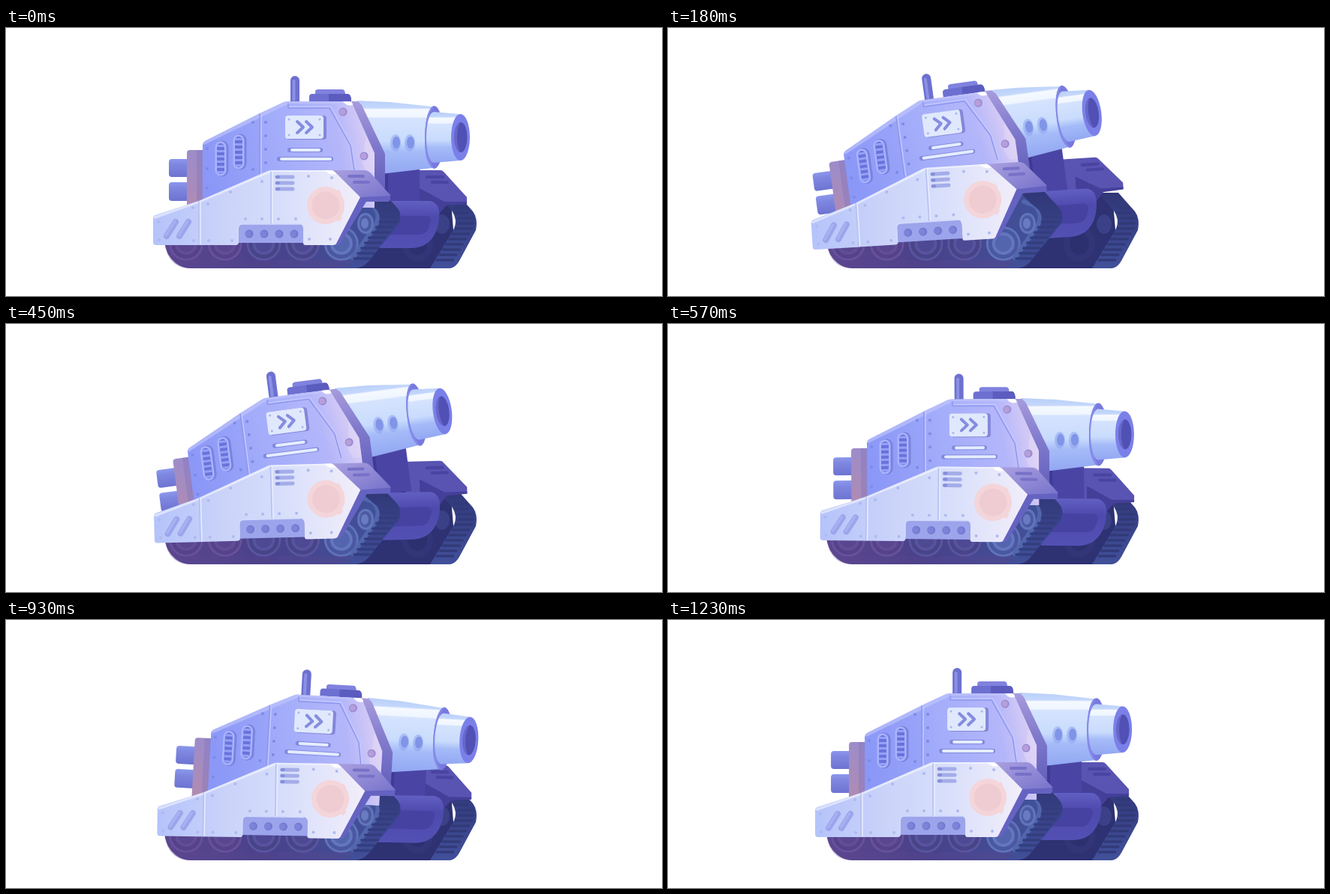
Animation of 874 by 358 pixels, one loop 1260 ms. Source, as an HTML page:

```html
<!DOCTYPE html>
<html lang="en">
<head>
<meta charset="utf-8">
<title>Tank recoil</title>
<style>
  html, body { margin: 0; width: 100%; height: 100%; overflow: hidden; background: #fff; }
  svg { display: block; width: 100%; height: 100%; }
  .line { fill: none; stroke-linecap: round; stroke-linejoin: round; }
</style>
</head>
<body>
<svg viewBox="0 0 874 358">
  <defs>
    <linearGradient id="track" gradientUnits="userSpaceOnUse" x1="211" x2="500">
      <stop stop-color="#5d4690"/><stop offset=".45" stop-color="#49418a"/><stop offset="1" stop-color="#40529a"/>
    </linearGradient>
    <linearGradient id="tread" gradientUnits="userSpaceOnUse" x1="0" x2="0" y1="220" y2="321">
      <stop stop-color="#303778"/><stop offset="1" stop-color="#41509a"/>
    </linearGradient>
    <linearGradient id="body" gradientUnits="userSpaceOnUse" x1="262" y1="190" x2="495" y2="145">
      <stop stop-color="#8c98f7"/><stop offset=".45" stop-color="#a3adfa"/>
      <stop offset=".78" stop-color="#b4b6fa"/><stop offset="1" stop-color="#e2d3f3"/>
    </linearGradient>
    <linearGradient id="face" x2="0" y2="1">
      <stop stop-color="#a79bdc"/><stop offset=".5" stop-color="#7f79cc"/><stop offset="1" stop-color="#6461bd"/>
    </linearGradient>
    <linearGradient id="skirt" gradientUnits="userSpaceOnUse" x1="196" x2="472">
      <stop stop-color="#b4c3fa"/><stop offset=".35" stop-color="#cbd3f9"/>
      <stop offset=".56" stop-color="#d3dcfb"/><stop offset="1" stop-color="#f2eefa"/>
    </linearGradient>
    <linearGradient id="steel" x2="0" y2="1">
      <stop stop-color="#b9cff9"/><stop offset=".1" stop-color="#c5d8fc"/><stop offset=".12" stop-color="#f5f9ff"/>
      <stop offset=".22" stop-color="#f0f6ff"/><stop offset=".24" stop-color="#d5e3fe"/>
      <stop offset=".55" stop-color="#c9dcfd"/><stop offset=".7" stop-color="#a5bbf8"/><stop offset="1" stop-color="#92a7f2"/>
    </linearGradient>
    <linearGradient id="engine" x2="0" y2="1">
      <stop stop-color="#9d8cc9"/><stop offset="1" stop-color="#b18bb0"/>
    </linearGradient>
    <linearGradient id="pipe" x2="0" y2="1">
      <stop stop-color="#8c97ec"/><stop offset=".3" stop-color="#7f88e0"/><stop offset="1" stop-color="#6d73d2"/>
    </linearGradient>
    <linearGradient id="belly" x2="0" y2="1">
      <stop stop-color="#625fc2"/><stop offset=".35" stop-color="#4e4aad"/><stop offset="1" stop-color="#5350b4"/>
    </linearGradient>
    <linearGradient id="fender" x2="1" y2="1">
      <stop stop-color="#aaa0e0"/><stop offset="1" stop-color="#7773cb"/>
    </linearGradient>
  </defs>

  <!-- far track -->
  <path fill="#2e3172" d="M450 321L520 222H592L600 316Q596 321 588 321Z"/>
  <ellipse cx="548" cy="288" rx="21" ry="24" fill="#323679"/>
  <ellipse cx="548" cy="288" rx="13" ry="15" fill="#2d306f"/>
  <ellipse cx="581" cy="262" rx="10" ry="13" fill="#3a4187"/>
  <path fill="url(#tread)" d="M572 220H600L622 245Q629 254 626 270L604 311Q599 321 588 321H565L597 268Q602 256 594 244Z"/>
  <path class="line" id="farTread" stroke="#313977" stroke-width="3"/>

  <g class="hull">
    <path fill="#5953b2" d="M532 190H579Q582 190 584 193L614 226V234H586L574 248H532Z"/>
    <path fill="#443f99" d="M551 214L584 232H614V235L587 237L574 252H551Z"/>
    <path class="line" stroke="#4944a0" stroke-width="4" d="M561 199H582M568 206H588"/>
  </g>
  <g class="turret">
    <path fill="#4a45a5" d="M488 165H551V246H488Z"/>
    <path fill="#3f3a94" d="M488 165H509V246H488Z"/>
  </g>
  <g class="hull">
    <path fill="url(#belly)" d="M490 231H565Q579 234 577 254C575 280 560 294 540 294H490Z"/>
    <path fill="#4642a2" d="M490 251H560Q569 252 564 264Q561 276 550 276H490Z"/>
  </g>

  <!-- near track -->
  <path fill="url(#track)" d="M211 285Q213 304 226 314Q235 321 245 321H463L500 275V218H462L420 262H215Z"/>
  <g id="wheels"></g>
  <path class="line" stroke="#5266ad" stroke-width="6" d="M474 232L488 237Q499 246 494 261L462 307"/>
  <ellipse cx="479" cy="261" rx="11" ry="14" fill="#6275bb"/>
  <ellipse cx="479" cy="261" rx="8" ry="11" fill="#4c5aa3"/>
  <ellipse cx="478" cy="261" rx="5" ry="7" fill="#697bc0"/>
  <path fill="url(#tread)" d="M468 218H501L521 240Q529 250 523 262L482 313Q474 321 463 321H458L495 267Q501 253 494 243L482 233Z"/>
  <path class="line" id="nearTread" stroke="#333c7d" stroke-width="3"/>
  <path fill="#5a478f" opacity=".3" d="M213 296Q222 310 245 310H460L452 321H245Q220 321 213 296Z"/>

  <g class="turret">
    <g id="gun">
      <path fill="url(#steel)" d="M468 97L512 99L568 105V187L500 195L480 165Z"/>
      <path fill="#8ba0ee" opacity=".5" d="M512 153a7 11 0 0 1 14 0v1a7 11 0 0 1-14 0zM531 153a7 11 0 0 1 14 0v1a7 11 0 0 1-14 0z"/>
      <path fill="#8094e8" d="M515 153a5 8 0 0 1 10 0a5 8 0 0 1-10 0zM534 153a5 8 0 0 1 10 0a5 8 0 0 1-10 0z"/>
      <ellipse cx="570.5" cy="146" rx="12.5" ry="42" fill="#7779df"/>
      <path fill="#858bea" d="M571 104Q559 109 558 146T571 188Q562 180 562 146T571 104Z"/>
      <path fill="url(#steel)" d="M570 112L605 115V177L570 180A10 34 0 0 1 570 112Z"/>
      <ellipse cx="605.5" cy="146" rx="12.5" ry="31" fill="#7b80e9"/>
      <ellipse cx="606" cy="146" rx="8.5" ry="20" fill="#5150b4"/>
      <path fill="#6767c9" d="M605 126Q597 130 597 146T605 166Q601 158 601 146T605 126Z"/>
    </g>
    <rect x="217" y="175" width="30" height="24" rx="4" fill="url(#pipe)"/>
    <rect x="217" y="206" width="30" height="25" rx="4" fill="url(#pipe)"/>
    <path fill="url(#engine)" d="M241 167Q241 163 245 163H264V246H241Z"/>
    <path fill="#8377be" opacity=".45" d="M254 163H264V246H254Z"/>
    <path fill="#6d70cf" d="M379 70a6 6 0 0 1 12 0V99H379Z"/>
    <path class="line" stroke="#8a90e6" stroke-width="4" d="M383.500 71V96"/>
    <path fill="#8082df" d="M412 89V85Q412 82 416 82H448Q452 82 452 89Z"/>
    <path fill="#6d70d0" d="M404 98V92Q404 88 408 88H455Q460 88 460 98Z"/>
    <path fill="#5b5cbe" d="M430 88H455Q460 88 460 98H430Z"/>

    <path fill="url(#face)" d="M458 98H469L474 103L505 168V214H488Z"/>
    <path fill="url(#body)" d="M262 156Q262 153 265 151L338 114L370 99Q372 98 375 98H460L491 167V240H262Z"/>
    <path fill="#8291f3" opacity=".18" d="M262 156L338 114V240H262Z"/>
    <path fill="#c4c9fd" d="M370 99L375 98H460L462 101H377L338 120L264 156L262 153L338 114Z" opacity=".6"/>
    <path fill="#fff" d="M449 98H458Q462 99 462 103Q453 105 449 98Z"/>
    <path class="line" stroke="#8f97ee" stroke-width="1.5" d="M338 115V196M376 101V107H431L459 157L464 190"/>
    <path class="line" stroke="#c2c8ff" stroke-width="1.500" d="M340 115V196M378 105H433L461 157L466 190"/>
    <path fill="#f3e6f7" opacity=".3" d="M491 168L480 144L474 180L480 193H491Z"/>

    <rect x="374" y="117" width="53" height="32" rx="4" fill="#8487d8"/>
    <rect x="372" y="117" width="51" height="31" rx="4" fill="#e0e8fe"/>
    <path class="line" stroke="#858de0" stroke-width="4" d="M388 125L396 132.500L388 140M400 125L408 132.500L400 140"/>
    <path class="line" stroke="#aab4ed" stroke-width="3" d="M377 122h0M418 122h0M377 143h0M418 143h0"/>
    <path class="line" stroke="#8089df" stroke-width="6" d="M378 163H419M364 175H433"/>
    <path class="line" stroke="#e5edff" stroke-width="4" d="M381 163H417M367 175H432"/>

    <g class="line">
      <path stroke="#7a83de" stroke-width="17" d="M288 159V190M312 150V181"/>
      <path stroke="#aab4ff" stroke-width="15" d="M286 159V190M310 150V181"/>
      <path stroke="#6973dc" stroke-width="10" d="M286 159V190M310 150V181"/>
      <path stroke="#95a1f5" stroke-width="10" stroke-linecap="butt" stroke-dasharray="3 4" d="M286 156V194M310 147V185"/>
    </g>
    <path class="line" stroke="#7f89e6" stroke-width="4" d="M346 126h0M346 144h0M346 162h0M346 180h0M268 161h0M268 188h0M268 214h0M329 126h0M329 189h0"/>
    <path class="line" stroke="#9989d0" stroke-width="11" d="M449 112h0M477 171h0"/>
    <path class="line" stroke="#b69edb" stroke-width="8" d="M448.500 112h0M476.500 171h0"/>
  </g>

  <g class="hull">
    <path fill="#6563c1" d="M470 224L512 223V230Q511 232 508 232H480L448 284Q445 290 438 290Z"/>
    <path fill="url(#fender)" d="M432 190H478Q482 190 485 193L513 224L472 226Z"/>
    <path class="line" stroke="#7772c8" stroke-width="4" d="M457 198H476M464 206H483"/>
    <path fill="#9ca4eb" d="M308 266Q308 262 312 262H392Q396 262 396 266V287H308Z"/>
    <path fill="url(#skirt)" d="M196 254Q196 251 199 250L257 231L349 191Q351 190 354 190H433Q436 190 438 192L472 226L440 288Q439 290 436 290H399Q396 290 396 287V268Q396 262 390 262H316Q310 262 310 268V286Q310 290 306 290H200Q196 290 196 286Z"/>
    <path fill="#fff" opacity=".5" d="M196 252L257 231L349 191L354 190H434L436 192H355L257 234L198 255Z"/>
    <path fill="#fff" d="M425 190H434Q437 191 440 195Q430 197 425 190Z"/>
    <path class="line" stroke="#b6c0f1" stroke-width="1.5" d="M257 232V289M353 192V262"/>
    <path class="line" stroke="#e8ecff" stroke-width="1.5" d="M259 232V289M355 192V262"/>
    <path class="line" stroke="#d2d9fc" stroke-width="1.5" d="M309 284V268Q309 262 315 262H391"/>
    <path class="line" stroke="#7379d0" stroke-width="11" d="M324 275h0M344 275h0M364 275h0M384 275h0"/>
    <path class="line" stroke="#7c83d8" stroke-width="8" d="M323 275h0M343 275h0M363 275h0M383 275h0"/>
    <path class="line" stroke="#a4ade9" stroke-width="5" d="M361 199H382M361 207H382M361 215H382"/>
    <path class="line" stroke="#858ed8" stroke-width="4" d="M361 199h2M361 207h2M361 215h2"/>
    <path class="line" stroke="#9aa5ea" stroke-width="8" d="M214 278L226 259M231 278L243 259"/>
    <path class="line" stroke="#a8b2f2" stroke-width="3" d="M213 277L225 258M230 277L242 258"/>
    <path class="line" stroke="#aeb9ee" stroke-width="4" d="M203 259h0M204 283h0M249 240h0M250 284h0M269 235h0M270 284h0M299 219h0M301 284h0M341 205h0M319 255h0M341 255h0M363 255h0M386 255h0M404 282h0M432 282h0M403 198h0M434 200h0"/>
    <circle cx="426" cy="237" r="21.500" fill="none" stroke="#f4d5d9" stroke-width="7"/>
    <circle cx="426" cy="237" r="18.500" fill="#efcbd2"/>
    <path fill="#f4d5d9" d="M438 219l5-3 4 5-5 4zM442 250l6 3-4 6-6-4z"/>
  </g>
</svg>
<script>
const PERIOD = 1260;
const $ = id => document.getElementById(id);
const each = (name, fn) => document.querySelectorAll('.' + name).forEach(fn);

function wheel(i) {
  const x = 240 + i * 51.7;
  const shades = i < 2 ? ['#66529a', '#56428b', '#624e97', '#594690']
    : i < 4 ? ['#5955a0', '#484488', '#57539e', '#4d4993']
    : ['#6073ba', '#4958a1', '#6477bd', '#5365ae'];
  return [23, 20, 15, 11].map((r, k) =>
    `<circle cx="${x}" cy="288" r="${r}" fill="${shades[k]}"/>`).join('');
}
$('wheels').innerHTML = [0, 1, 2, 3, 4].map(wheel).join('');

// Tread bars step down the slanted front of a track.
function bars(x, y, dx, width, count) {
  let d = '';
  for (let i = 0; i < count; i++) d += `M${x - dx * i} ${y + i * 7}h${width}`;
  return d;
}
$('nearTread').setAttribute('d', bars(498, 238, 0, 19, 1) + bars(501, 245, 0, 20, 2) + bars(498, 259, 4.9, 22, 8));
$('farTread').setAttribute('d', bars(598, 240, 0, 17, 2) + bars(602, 254, 0, 20, 2) + bars(599, 268, 4.2, 22, 7));

// Sine easing between [time, value] keys.
function ease(t, keys) {
  const i = keys.findIndex(k => k[0] > t);
  const [t0, a] = keys[i - 1], [t1, b] = keys[i];
  return a + (b - a) * (1 - Math.cos(Math.PI * (t - t0) / (t1 - t0))) / 2;
}
// Kick back, optionally hold, swing forward, settle.
const hullSwing = (t, back, front) => ease(t, [[0, 0], [230, back], [690, front], [PERIOD, 0]]);
const turretSwing = (t, back, hold, front) =>
  ease(t, [[0, 0], [210, back], [hold, back], [700, front], [PERIOD, 0]]);

function draw(now) {
  const t = Math.floor(now % PERIOD / 30) * 30;
  const hullX = hullSwing(t, -8, 10);
  const hullTilt = hullSwing(t, -4, 1.4);
  const turretX = turretSwing(t, -37.5, 355, 21);
  const turretY = turretSwing(t, -12.5, 360, 9);
  const turretTilt = turretSwing(t, -8.3, 400, 5);
  const recoil = ease(t, [[0, 0], [100, -10], [400, 0], [PERIOD, 0]]);
  each('hull', g => g.setAttribute('transform', `translate(${hullX}) rotate(${hullTilt} 300 228)`));
  each('turret', g => g.setAttribute('transform', `translate(${turretX} ${turretY}) rotate(${turretTilt} 449 112)`));
  $('gun').setAttribute('transform', `translate(${recoil})`);
  requestAnimationFrame(() => draw(performance.now()));
}
draw(0);
</script>
</body>
</html>
```
